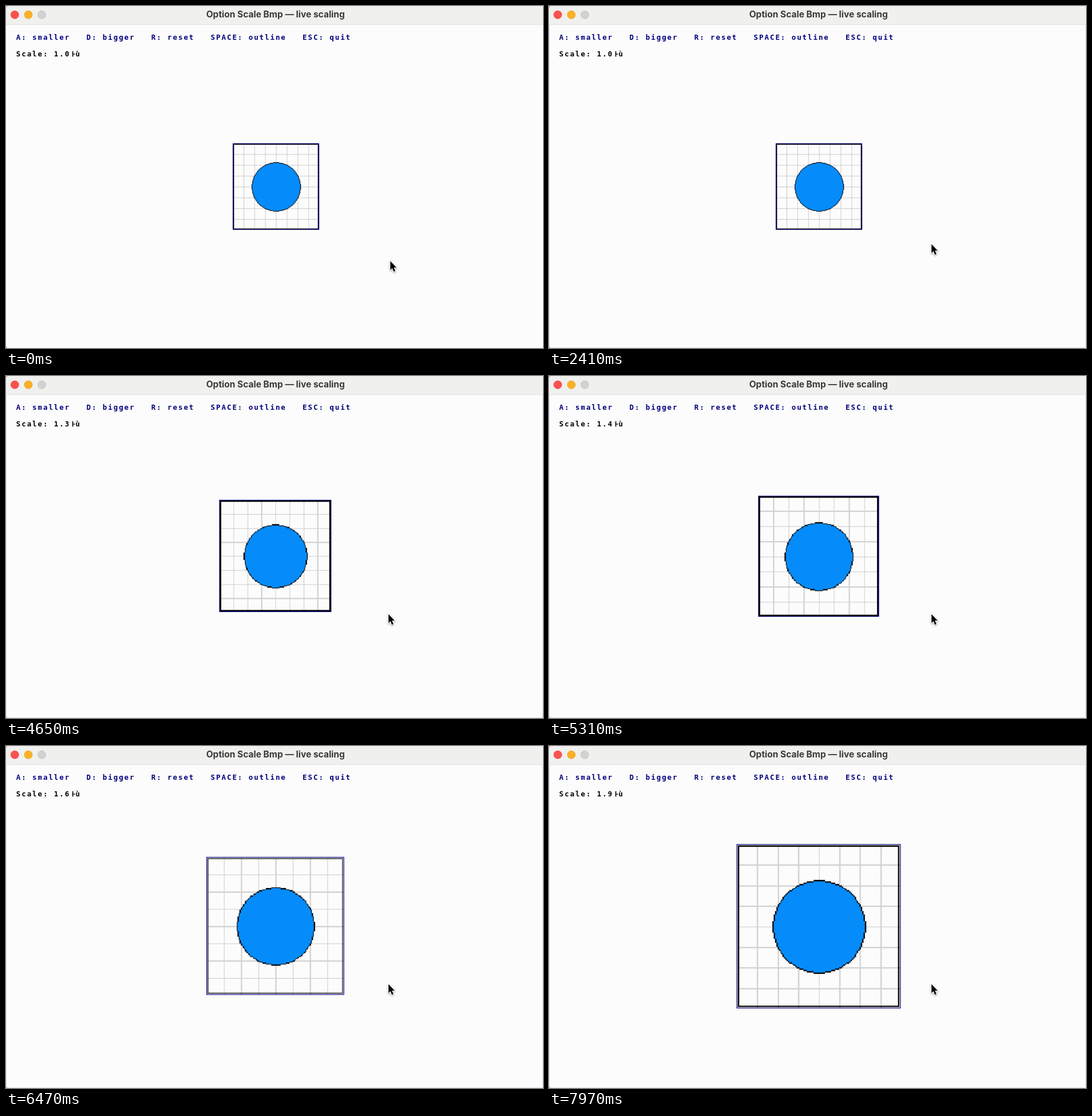
An HTML page with a canvas that plays this animation: 938x597 px, repeating every 7.99 s.

```html
<!DOCTYPE html>
<html lang="en">
<head>
<meta charset="utf-8">
<title>Live scaling</title>
<style>
  html, body { margin: 0; width: 100%; height: 100%; overflow: hidden; background: #fcfcfc; }
  canvas { display: block; }
</style>
</head>
<body>
<canvas id="stage" width="938" height="597"></canvas>
<script>
const LOOP = 7990;
const UNIT = 1.18;          // stage pixels per window pixel
const LEFT = -0.5, TOP = 32; // window origin on the stage
const CELL = 8 * UNIT;
const SIZE = 128;
const NAVY = '#00007c', PALE = '#dfdff1';
const FIRST_STEP = 3130, STEP = 600;

const ctx = document.getElementById('stage').getContext('2d');

function makeCanvas(w, h) {
  const c = document.createElement('canvas');
  c.width = w;
  c.height = h;
  return c;
}

function makeSprite() {
  const c = makeCanvas(SIZE, SIZE), g = c.getContext('2d');
  g.fillStyle = '#fcfcfc';
  g.fillRect(0, 0, SIZE, SIZE);
  g.fillStyle = '#d2d2d2';
  for (let i = 0; i < SIZE; i += 16) {
    g.fillRect(i, 0, 1, SIZE);
    g.fillRect(0, i, SIZE, 1);
  }
  const inside = (x, y) => Math.hypot(x - 64, y - 64) <= 36.3;
  for (let y = 0; y < SIZE; y++) {
    for (let x = 0; x < SIZE; x++) {
      if (!inside(x, y)) continue;
      const core = inside(x - 1, y) && inside(x + 1, y) && inside(x, y - 1) && inside(x, y + 1);
      g.fillStyle = core ? '#058cfa' : '#000';
      g.fillRect(x, y, 1, 1);
    }
  }
  g.strokeStyle = '#000';
  g.strokeRect(1.5, 1.5, SIZE - 3, SIZE - 3);
  return c;
}

const sprite = makeSprite();
const view = makeCanvas(800, 480);
const vctx = view.getContext('2d');

function disc(x, y, r, fill, edge) {
  ctx.beginPath();
  ctx.arc(x, y, r, 0, Math.PI * 2);
  ctx.fillStyle = fill;
  ctx.fill();
  ctx.strokeStyle = edge;
  ctx.lineWidth = 0.7;
  ctx.stroke();
}

function drawWindow(t) {
  ctx.fillStyle = '#fcfcfc';
  ctx.fillRect(0, 0, 938, 597);
  ctx.fillStyle = '#f0f0ee';
  ctx.fillRect(0, 0, 938, 32);
  ctx.fillStyle = PALE;
  ctx.fillRect(0, 32, 938, 1);
  if (t >= 30) {
    ctx.fillRect(0, 32, 1, 565);
    ctx.fillRect(937, 32, 1, 565);
    ctx.fillRect(0, 596, 938, 1);
  }
  // rounded corners on the left side
  ctx.fillStyle = '#b4b4b4';
  for (const [y, dir] of [[0, 1], [597, -1]]) {
    ctx.beginPath();
    ctx.moveTo(0, y);
    ctx.lineTo(5, y);
    ctx.quadraticCurveTo(0, y, 0, y + 5 * dir);
    ctx.fill();
  }
  disc(15.3, 15.3, 7, '#fc524e', '#e0463f');
  disc(39, 15.3, 7, '#fcb024', '#e0a028');
  disc(62.5, 15.3, 7, '#d2d2d1', '#c0c0c0');

  ctx.fillStyle = '#3a3a3a';
  ctx.font = '700 15.5px Inter, sans-serif';
  ctx.textAlign = 'center';
  ctx.fillText('Option Scale Bmp — live scaling', 470.7, 20.4);
}

function cellText(text, x, y, color) {
  ctx.font = 'bold 12.5px "DejaVu Sans Mono", monospace';
  ctx.textAlign = 'center';
  ctx.fillStyle = color;
  [...text].forEach((ch, i) => ctx.fillText(ch, x + (i + 0.46) * CELL, y));
}

function drawLabels(tenths) {
  const x = 15 * UNIT + LEFT;
  cellText('A: smaller   D: bigger   R: reset   SPACE: outline   ESC: quit', x, 59, NAVY);
  cellText('Scale: ' + (tenths / 10).toFixed(1), x, 87.6, '#000');
  // box-drawing tee followed by an accented letter
  ctx.fillRect(x + 10.45 * CELL, 79, 1.6, 9.4);
  ctx.fillRect(x + 10.45 * CELL, 83.4, 5, 1.2);
  cellText('ù', x + 11 * CELL, 87.6, '#000');
}

function drawSprite(tenths) {
  const half = 64 * tenths / 10;
  const x = Math.floor(400 - half), y = Math.floor(240 - half);
  const w = Math.floor(SIZE * tenths / 10);
  vctx.clearRect(0, 0, 800, 480);
  vctx.imageSmoothingEnabled = false;
  vctx.drawImage(sprite, x, y + 0.01, w, w);
  vctx.strokeStyle = NAVY;
  vctx.strokeRect(x + 0.5, y + 0.5, w - 1, w - 1);
  ctx.drawImage(view, LEFT, TOP, 800 * UNIT, 480 * UNIT);
}

function ease(t, from, to) {
  const p = Math.min(1, Math.max(0, (t - from) / (to - from)));
  return p * p * (3 - 2 * p);
}

function drawCursor(t) {
  const rise = ease(t, 60, 730), settle = ease(t, 850, 1400);
  ctx.save();
  ctx.translate(671.3 - 3.2 * settle, 445.3 - 26 * rise - 3.6 * settle);
  ctx.beginPath();
  for (const [x, y] of [[0, 0], [0, 15.5], [3.4, 12.4], [6, 18.5], [8.7, 17.3], [6.1, 11.3], [10.8, 11.3]]) {
    ctx.lineTo(x, y);
  }
  ctx.closePath();
  ctx.lineJoin = 'round';
  ctx.lineWidth = 2.4;
  ctx.strokeStyle = '#fff';
  ctx.shadowColor = 'rgba(0,0,0,0.4)';
  ctx.shadowBlur = 3;
  ctx.shadowOffsetY = 1;
  ctx.stroke();
  ctx.shadowColor = 'transparent';
  ctx.fillStyle = '#000';
  ctx.fill();
  ctx.restore();
}

function frame() {
  const t = performance.now() % LOOP;
  const tenths = 10 + Math.max(0, Math.floor((t - FIRST_STEP) / STEP) + 1);
  drawWindow(t);
  drawLabels(tenths);
  drawSprite(tenths);
  drawCursor(t);
  requestAnimationFrame(frame);
}
frame();
</script>
</body>
</html>
```
